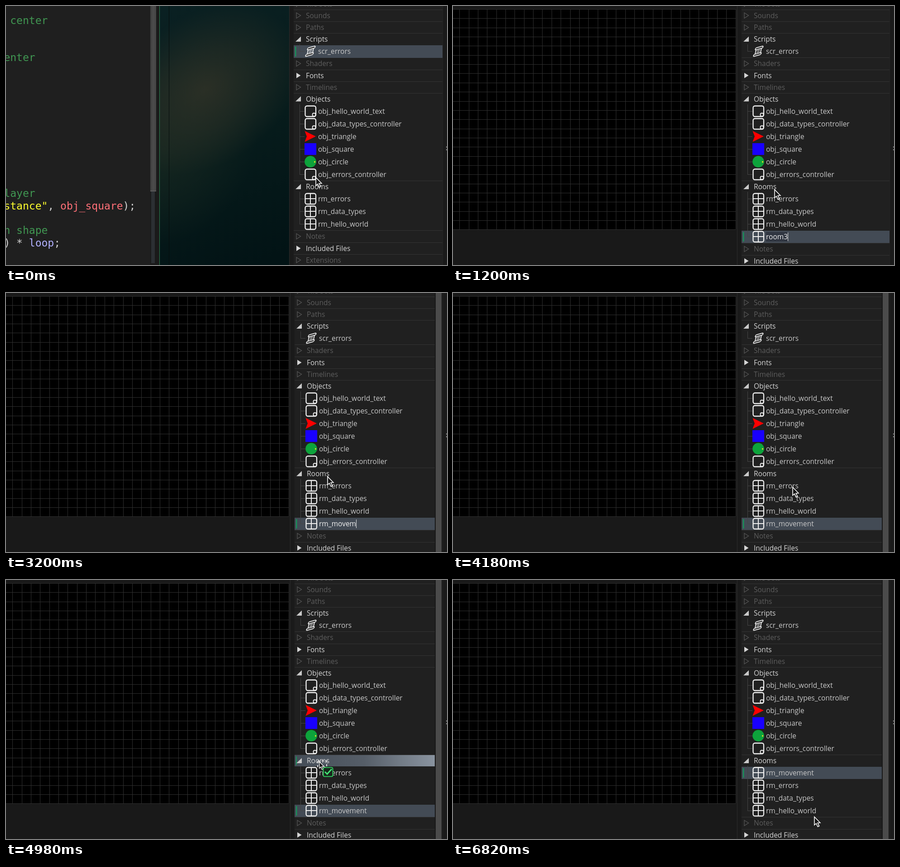
Recreate the animation shown at these times as an HTML page with a canvas. Size 975x574 px, loop 6.84 s.

```html
<!DOCTYPE html>
<html lang="en">
<head>
<meta charset="utf-8">
<style>
html, body { margin: 0; width: 100%; height: 100%; overflow: hidden; background: #191919; }
canvas { display: block; }
</style>
</head>
<body>
<canvas id="stage" width="975" height="574"></canvas>
<script>
const ctx = document.getElementById('stage').getContext('2d');
const W = 975, H = 574, LOOP = 6840;
const UI = '15.5px "Open Sans", sans-serif';
const MENU_FONT = '15.3px "Open Sans", sans-serif';
const CODE = '23px "DejaVu Sans Mono", monospace';

// Moments at which the state switches, in ms
const T = { select: 280, menu: 340, open: 820, bar: 1300, type: 2640, enter: 3700, drag: 4440, hover: 4760, drop: 5120 };
const KEY_STEP = 72;
const NEW_NAME = 'rm_movement';

// Pointer path: time, x, y
const PATH = [
  [0, 684, 379], [60, 684, 379], [240, 684, 397], [460, 684, 397], [700, 710, 406],
  [3780, 710, 406], [4160, 750, 429], [4200, 750, 430], [4400, 750, 504],
  [4480, 750, 504], [4860, 692, 402], [5180, 692, 402], [5700, 798, 524], [LOOP, 798, 524]
];

function pointerAt(t) {
  const i = PATH.findIndex((p, k) => k > 0 && t <= p[0]);
  const [t0, x0, y0] = PATH[i - 1], [t1, x1, y1] = PATH[i];
  const u = (t - t0) / (t1 - t0), e = u * u * (3 - 2 * u);
  return [x0 + (x1 - x0) * e, y0 + (y1 - y0) * e];
}

function rect(x, y, w, h, color) {
  ctx.fillStyle = color;
  ctx.fillRect(x, y, w, h);
}

function text(str, x, y, color, font = UI) {
  ctx.font = font;
  ctx.fillStyle = color;
  ctx.fillText(str, x, y);
}

function shape(points, fill, stroke, width = 1) {
  ctx.beginPath();
  points.forEach(([x, y]) => ctx.lineTo(x, y));
  ctx.closePath();
  if (fill) { ctx.fillStyle = fill; ctx.fill(); }
  if (stroke) { ctx.strokeStyle = stroke; ctx.lineWidth = width; ctx.stroke(); }
}

function box(x, y, w, h, r, color, width, fill) {
  ctx.beginPath();
  ctx.roundRect(x, y, w, h, r);
  if (fill) { ctx.fillStyle = fill; ctx.fill(); }
  ctx.strokeStyle = color;
  ctx.lineWidth = width;
  ctx.stroke();
}

function line(x1, y1, x2, y2, color, width) {
  ctx.beginPath();
  ctx.moveTo(x1, y1);
  ctx.lineTo(x2, y2);
  ctx.strokeStyle = color;
  ctx.lineWidth = width;
  ctx.stroke();
}

// Soft elliptical light, fading to nothing at its rim
function glow(x, y, radius, angle, stretch, rgb, alpha) {
  ctx.save();
  ctx.translate(x, y);
  ctx.rotate(angle);
  ctx.scale(stretch, 1);
  const light = ctx.createRadialGradient(0, 0, 0, 0, 0, radius);
  light.addColorStop(0, `rgba(${rgb},${alpha})`);
  light.addColorStop(0.5, `rgba(${rgb},${alpha * 0.55})`);
  light.addColorStop(1, `rgba(${rgb},0)`);
  rect(-radius, -radius, radius * 2, radius * 2, light);
  ctx.restore();
}

function drawCode(focused) {
  rect(0, 0, 319, H, '#1f1f1f');
  const green = '#409752', white = '#d2d2d2';
  const char = 13.85, left = -4.6;
  const put = (str, col, y, color) => text(str, left + col * char, y, color, CODE);
  put('center', 1, 39.5, green);
  put('enter', 0, 121.5, green);
  put('layer', 0, 423, green);
  put('stance"', 0, 450.6, '#ffff2e');
  put(',', 7, 450.6, white);
  put('obj_square', 9, 450.6, '#ff7078');
  put(');', 19, 450.6, white);
  put('n shape', 0, 505, green);
  put(') *', 0, 532.7, white);
  put('loop', 4, 532.7, '#b2b1ff');
  put(';', 8, 532.7, white);

  rect(319, 0, 21, H, '#1a1a1a');
  rect(321, 411, 8, 159, '#2b2f33');
  const thumb = ctx.createLinearGradient(318, 0, 332, 0);
  thumb.addColorStop(0, '#3b3b3b');
  thumb.addColorStop(0.5, '#4c4c4c');
  thumb.addColorStop(1, '#444');
  rect(319, 0, 13, 409, thumb);
  rect(319, 409, 13, 2, '#5b5b5b');

  const base = ctx.createLinearGradient(340, 0, 560, H);
  base.addColorStop(0, '#0a2022');
  base.addColorStop(0.5, '#071c1c');
  base.addColorStop(1, '#021315');
  rect(340, 0, 286, H, base);
  ctx.save();
  ctx.beginPath();
  ctx.rect(340, 0, 286, H);
  ctx.clip();
  glow(350, 320, 190, -0.9, 1.2, '30,44,34', 0.6);
  glow(440, 185, 165, -0.6, 1.4, '44,48,38', 0.95);
  ctx.restore();
  rect(339, 0, 1, H, focused ? '#2b8351' : '#34383a');
  rect(360, 0, 1, H, '#050c0c');
}

function drawRoom() {
  rect(0, 0, 628, H, '#191919');
  rect(0, 7, 625, 488, '#000');
  const cell = 20.35;
  for (let i = 0; i <= 30; i++) rect(Math.round(14.3 + i * cell), 7, 1, 488, '#2f2f2f');
  for (let i = 0; i <= 24; i++) rect(0, Math.round(7 + i * cell), 625, 1, '#2f2f2f');
}

function scriptIcon(x, y) {
  ctx.save();
  ctx.translate(x, y);
  ctx.transform(1, -0.28, -0.22, 1, 0, 0);
  box(-6, -7, 12, 14, 1, '#eee', 2);
  box(-8, -9, 17, 4.5, 2.2, '#eee', 2, '#202020');
  box(-9, 5, 17, 4.5, 2.2, '#eee', 2, '#202020');
  [-1.5, 2].forEach(dy => line(-3.5, dy, 3.5, dy, '#eee', 1.7));
  ctx.restore();
}

function objectIcon(x, y) {
  box(x - 11.5, y - 11.5, 23.5, 23.5, 4, '#eee', 2.3);
  box(x + 4.5, y + 4.5, 7, 7, 3, '#eee', 1.8);
}

function roomIcon(x, y) {
  box(x - 11.5, y - 11.5, 23.5, 23.5, 4, '#eee', 2.3);
  line(x, y - 11, x, y + 12, '#eee', 2);
  line(x - 11, y, x + 12, y, '#eee', 2);
}

function triangleIcon(x, y) {
  shape([[x - 12.5, y - 12], [x + 12, y], [x - 12.5, y + 12], [x - 8, y]], '#f00');
}

function squareIcon(x, y) {
  rect(x - 13, y - 13, 26, 26, '#1900ff');
}

function circleIcon(x, y) {
  ctx.beginPath();
  ctx.arc(x, y, 12.8, 0, Math.PI * 2);
  ctx.fillStyle = '#0da33b';
  ctx.fill();
  rect(x + 8, y - 1, 3, 3, '#d3d526');
}

const OBJECTS = [
  ['obj_hello_world_text', objectIcon], ['obj_data_types_controller', objectIcon],
  ['obj_triangle', triangleIcon], ['obj_square', squareIcon],
  ['obj_circle', circleIcon], ['obj_errors_controller', objectIcon]
];
const ROOMS = ['rm_errors', 'rm_data_types', 'rm_hello_world'];

function header(label, y, kind, dx) {
  const x = 646 + dx;
  if (kind === 'open') shape([[x + 6, y - 6], [x + 6, y + 5.5], [x - 6, y + 5.5]], '#c9c9c9');
  else {
    const arrow = [[x - 4, y - 6], [x + 5.5, y], [x - 4, y + 6]];
    kind === 'closed' ? shape(arrow, '#d4d4d4') : shape(arrow, null, '#555', 1.3);
  }
  text(label, 663 + dx, y + 5.5, kind === 'empty' ? '#5d5d5d' : '#d6d6d6');
}

function branch(rows, y, dx) {
  rect(649 + dx, y - 15, 1, (rows.length - 1) * 28 + 15, '#454545');
  rows.forEach(([label, icon], i) => {
    rect(649 + dx, y + i * 28, 11, 1, '#454545');
    icon(673 + dx, y + i * 28);
    if (label) text(label, 690 + dx, y + i * 28 + 5.6, '#c8c8c8');
  });
}

function selection(y, h, dx, right) {
  rect(636 + dx, y, right - 636 - dx, h, '#434b55');
  rect(639 + dx, y + 3, 2.5, h - 6, '#18925a');
}

function drawPanel(t) {
  const opened = t >= T.open, dx = opened ? 2 : 0;
  const right = t >= T.bar ? 948 : 965;
  rect(626, 0, W - 626, H, '#1a1a1a');
  rect(626 + dx, 0, 1, H, '#2c2c2c');
  rect(636 + dx, 0, right - 636 - dx, H, '#202020');
  if (t >= T.bar) {
    rect(948, 0, 17, H, '#181818');
    rect(950, 0, 13, H, '#4b4b4b');
  }
  rect(965, 0, 1, H, '#252525');
  rect(973, 311, 2, 3, '#777');
  rect(973, 317, 2, 3, '#777');

  const shift = opened ? 28 : 0;
  [8, 34, 60, 114, 141, 167, 193, 387, 497 + shift, 524 + shift, 550 + shift]
    .forEach(y => rect(636 + dx, y, right - 636 - dx, 1, '#343434'));

  if (t < T.select) selection(87, 28, dx, right);
  else if (!opened) selection(388, 25, dx, right);
  else selection(t < T.drop ? 498 : 414, 27, dx, right);

  if (t >= T.hover && t < T.drop) {
    const sheen = ctx.createLinearGradient(638, 0, 948, 0);
    sheen.addColorStop(0, '#454d57');
    sheen.addColorStop(0.5, '#565e68');
    sheen.addColorStop(0.75, '#727b86');
    sheen.addColorStop(1, '#89939f');
    rect(638, 388, right - 638, 25, sheen);
    rect(641, 391, 2, 19, '#18925a');
  }

  header('Tile Sets', -5, 'empty', dx);
  header('Sounds', 21, 'empty', dx);
  header('Paths', 47.5, 'empty', dx);
  header('Scripts', 73.5, 'open', dx);
  header('Shaders', 127.5, 'empty', dx);
  header('Fonts', 154, 'closed', dx);
  header('Timelines', 180, 'empty', dx);
  header('Objects', 206, 'open', dx);
  header('Rooms', 400.5, 'open', dx);
  header('Notes', 510.5 + shift, 'empty', dx);
  header('Included Files', 537 + shift, 'closed', dx);
  header('Extensions', 563 + shift, 'empty', dx);

  branch([['scr_errors', scriptIcon]], 100, dx);
  branch(OBJECTS, 233, dx);
  const names = [...ROOMS];
  if (t >= T.drop) names.unshift(NEW_NAME);
  else if (t >= T.enter) names.push(NEW_NAME);
  else if (opened) names.push('');
  branch(names.map(n => [n, roomIcon]), 427, dx);
  if (opened && t < T.enter) drawRename(t);
}

function drawRename(t) {
  const typing = t >= T.type;
  const typed = Math.floor((t - T.type) / KEY_STEP) + 1;
  const name = typing ? NEW_NAME.slice(0, typed) : 'room3';
  ctx.font = UI;
  const width = ctx.measureText(name).width;
  if (!typing) rect(692, 501, width, 21, '#303641');
  text(name, 692, 516.6, '#f0f0f0');
  const blinkOn = (t - T.open) % 800 < 400;
  if (blinkOn || typing && typed <= NEW_NAME.length) rect(Math.round(692 + width), 502, 1, 19, '#e8e8e8');
}

const MENU = [
  ['Create Room', 'ALT+R', 1], ['Edit All', '', 1], ['Add Existing', '', 1],
  ['Add Existing From My Library', '', 1], ['Add Group', '', 1],
  ['Rename', 'F2', 0], ['Delete', 'Delete', 0], ['Duplicate', '  D', 0]
];

function drawMenu() {
  rect(690, 404, 269, H, 'rgba(0,0,0,.25)');
  rect(685, 399, 271, H, '#303030');
  rect(686, 400, 269, H, '#1c1c1c');
  MENU.forEach(([label, key, enabled], i) => {
    const y = 418 + i * 23.6, color = enabled ? '#e9e9e9' : '#737373';
    text(label, 688.5, y, color, MENU_FONT);
    text(key, 899, y, color, MENU_FONT);
  });
}

function drawPointer(t) {
  const [x, y] = pointerAt(t);
  const dragging = t >= T.drag && t < T.drop;
  ctx.save();
  ctx.translate(x, y);
  if (dragging) {
    ctx.setLineDash([5, 4]);
    box(-3, -1, 20, 14, 0, '#e0e0e0', 2);
    ctx.setLineDash([]);
    ctx.scale(0.8, 0.8);
  }
  shape([[1, 1], [1, 19], [5, 15.5], [8.4, 22.8], [11.6, 21.3], [8.2, 14.3], [13.8, 14]], '#161616', '#fff', 1.6);
  if (dragging) {
    ctx.scale(1.25, 1.25);
    box(9.5, 13.5, 21, 20, 3, '#2fc65b', 2, '#17251c');
    ctx.beginPath();
    ctx.moveTo(13, 23);
    ctx.lineTo(18, 28);
    ctx.lineTo(28, 17);
    ctx.strokeStyle = '#41e071';
    ctx.lineWidth = 3;
    ctx.stroke();
  }
  ctx.restore();
}

function draw(now) {
  const t = now % LOOP;
  ctx.clearRect(0, 0, W, H);
  if (t < T.open) drawCode(t < T.select);
  else drawRoom();
  drawPanel(t);
  if (t >= T.menu && t < T.open) drawMenu();
  drawPointer(t);
}

const start = performance.now();
function tick() {
  draw(performance.now() - start);
  requestAnimationFrame(tick);
}
tick();
</script>
</body>
</html>
```
